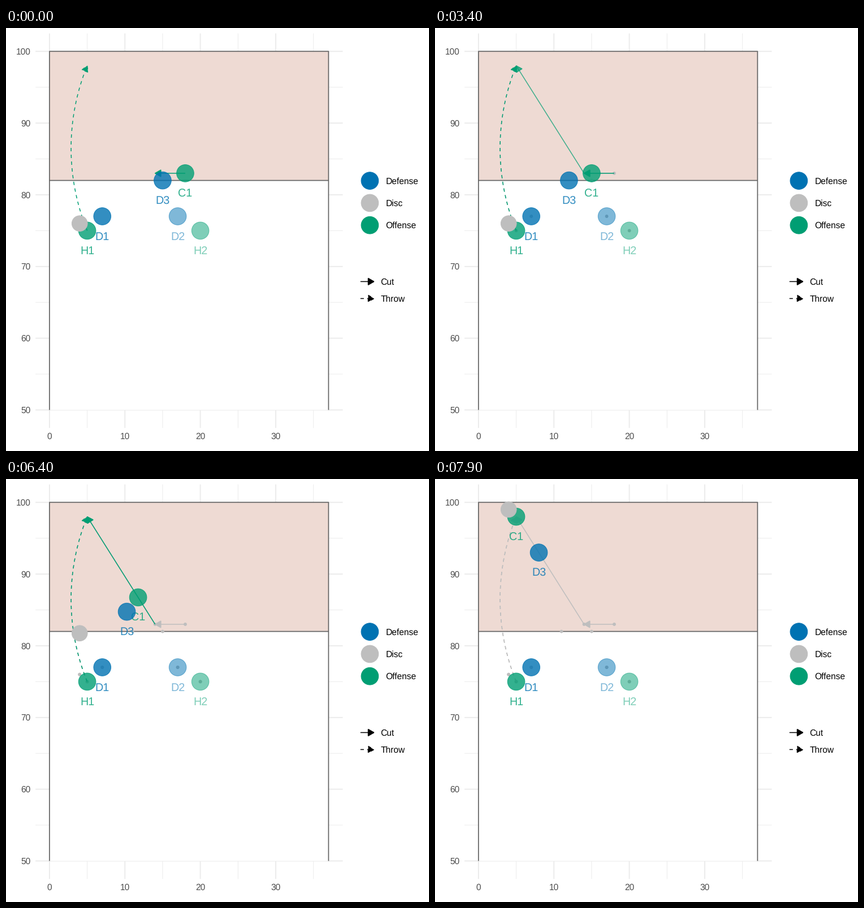
A matplotlib script for the animation above (10 s loop, 748 by 748 pixels).

```python
import numpy as np
import matplotlib.pyplot as plt
from matplotlib.animation import FuncAnimation
from matplotlib.patches import Circle, Polygon, Rectangle

SIZE, DPI = 748, 64
PT = 72 / DPI  # points per pixel
FRAMES, STEP_MS = 100, 100
TWEEN = 20  # frames per move

GREEN, BLUE, GREY = "#009E73", "#0072B2", "#BEBEBE"
GRID, EDGE, ZONE = "#EBEBEB", "#636363", "#EEDAD3"
LINE, HEAD = 1.5, 11.8
DASH = (0, (4, 4))

plt.rcParams["path.snap"] = False
plt.rcParams["font.family"] = "Liberation Sans"
plt.rcParams["text.hinting"] = "none"

fig = plt.figure(figsize=(SIZE / DPI, SIZE / DPI), dpi=DPI, facecolor="white")
ax = fig.add_axes([0, 0, 1, 1])
ax.set_xlim(0, SIZE)
ax.set_ylim(SIZE, 0)
ax.axis("off")


def px(x, y):
    """Field coordinates to stage pixels."""
    return np.array([76.9 + 13.337 * x, 41.3 + 12.682 * (100 - y)])


def line(xs, ys, color, width=LINE, z=1, style="-"):
    return ax.plot(xs, ys, color=color, lw=width * PT, ls=style, zorder=z,
                   solid_capstyle="butt", dash_capstyle="butt",
                   solid_joinstyle="round")[0]


def label(x, y, text, size, color, ha="left", z=1, alpha=1):
    # y is the middle of the capital letters
    return ax.text(x, y + 0.358 * size, text, size=size * PT, color=color,
                   ha=ha, va="baseline", zorder=z, alpha=alpha)


def disk(pos, r, color, z, alpha=1):
    return ax.add_patch(Circle(pos, r, facecolor=color, edgecolor=color,
                               lw=PT, alpha=alpha, zorder=z))


def arrow(pts, color, z, style="-"):
    """Polyline with a filled closed head at its last point."""
    pts = np.asarray(pts, float)
    tip = pts[-1]
    back = pts[-2] - tip
    back /= np.hypot(*back)
    side = np.array([-back[1], back[0]])
    base = tip + back * HEAD * np.cos(np.pi / 6)
    corners = [base + side * HEAD / 2, tip, base - side * HEAD / 2]
    shaft = line(pts[:, 0], pts[:, 1], color, z=z, style=style)
    head = ax.add_patch(Polygon(corners, facecolor=color, edgecolor=color,
                                lw=LINE * PT, ls=style, joinstyle="miter",
                                capstyle="butt", zorder=z))
    return [shaft, head]


def arc(a, b, sagitta):
    """Circular arc from a straight up to b, bulging to the left."""
    half = (a[1] - b[1]) / 2
    r = (half ** 2 + sagitta ** 2) / (2 * sagitta)
    t = np.linspace(-1, 1, 80) * np.arcsin(half / r)
    cx, cy = a[0] - sagitta + r, (a[1] + b[1]) / 2
    return np.column_stack([cx - r * np.cos(t), cy - r * np.sin(t)])


def show(parts, on):
    for part in parts:
        part.set_visible(bool(on))


# grid and axis labels
left, right, top, bottom = 52.2, 595.5, 9.6, 707.2
for i in range(8):
    x = px(5 * i, 0)[0]
    line([x, x], [top, bottom], GRID, 0.95 if i % 2 else 1.9, z=0)
    if i % 2 == 0:
        label(x, 721.3, str(5 * i), 15.56, "#4D4D4D", "center")
for i in range(11):
    v = 50 + 5 * i
    y = px(0, v)[1]
    line([left, right], [y, y], GRID, 0.95 if i % 2 else 1.9, z=0)
    if i % 2 == 0:
        label(43.7, y, str(v), 15.56, "#4D4D4D", "right")

# field and end zone
x0, y0 = px(0, 100)
x1, y1 = px(37, 50)
goal = px(0, 82)[1]
ax.add_patch(Rectangle((x0, y0), x1 - x0, y1 - y0, fc="white", lw=0, zorder=1))
ax.add_patch(Rectangle((x0, y0), x1 - x0, goal - y0, fc=ZONE, lw=0, zorder=1))
line([x0, x0, x1, x1], [y1, y0, y0, y1], EDGE, 1.7, z=1.2)
line([x0, x1], [goal, goal], EDGE, 1.7, z=1.2)

# legend
for y, name, color in [(270.1, "Defense", BLUE), (309.4, "Disc", GREY),
                       (348.7, "Offense", GREEN)]:
    disk((643.4, y), 15.3, color, 1)
    label(671.4, y, name, 15.56, "black")
for y, name, style in [(448.4, "Cut", "-"), (478.4, "Throw", DASH)]:
    arrow([(626.8, y), (650.7, y)], "black", 1, style)
    label(662.5, y, name, 15.56, "black")

# name, colour, alpha, radius, position in each of the three states
PLAYERS = [
    ("H1", GREEN, 0.8, 15.3, [(5, 75)] * 3),
    ("H2", GREEN, 0.5, 15.3, [(20, 75)] * 3),
    ("C1", GREEN, 0.8, 15.3, [(18, 83), (14, 83), (5, 98)]),
    ("D1", BLUE, 0.8, 15.3, [(7, 77)] * 3),
    ("D2", BLUE, 0.5, 15.3, [(17, 77)] * 3),
    ("D3", BLUE, 0.8, 15.3, [(15, 82), (11, 82), (8, 93)]),
    ("", GREY, 1, 13.8, [(4, 76), (4, 76), (4, 99)]),
]

cut_a = [px(18, 83), px(14, 83)]
cut_b = [px(14, 83), px(5, 98)]
throw = arc(px(5, 75), px(5, 98), 28.5)

# grey traces left by the first and second state
traces = []
for state, cut in enumerate([cut_a, cut_b]):
    parts = arrow(cut, GREY, 2) + arrow(throw, GREY, 2, DASH)
    parts += [disk(px(*p[4][state]), 2.4, GREY, 2) for p in PLAYERS]
    traces.append(parts)

live_a = arrow(cut_a, GREEN, 3)
live_b = arrow(cut_b, GREEN, 3)
live_throw = arrow(throw, GREEN, 3, DASH)

movers = []
for name, color, alpha, r, path in PLAYERS:
    spot = px(*path[0])
    text = label(*spot, name, 19.8, color, "center", 4, alpha)
    movers.append((disk(spot, r, color, 5, alpha), text,
                   [px(*p) for p in path]))


def update(frame):
    p = np.clip((frame - 19) / TWEEN, 0, 1)
    q = np.clip((frame - 59) / TWEEN, 0, 1)
    for dot, text, (a, b, c) in movers:
        pos = a + (b - a) * p + (c - b) * q
        dot.center = pos
        text.set_position((pos[0], pos[1] + 34.7 + 0.358 * 19.8))
    show(traces[0], p > 0)
    show(traces[1], q > 0)
    show(live_a, p < 1)
    show(live_b, p > 0 and q < 1)
    show(live_throw, q < 1)
    for part in live_b:
        part.set_alpha(p)
    return []


anim = FuncAnimation(fig, update, frames=FRAMES, interval=STEP_MS,
                     init_func=lambda: update(0), repeat=True,
                     repeat_delay=0, blit=False)
plt.show()
```
